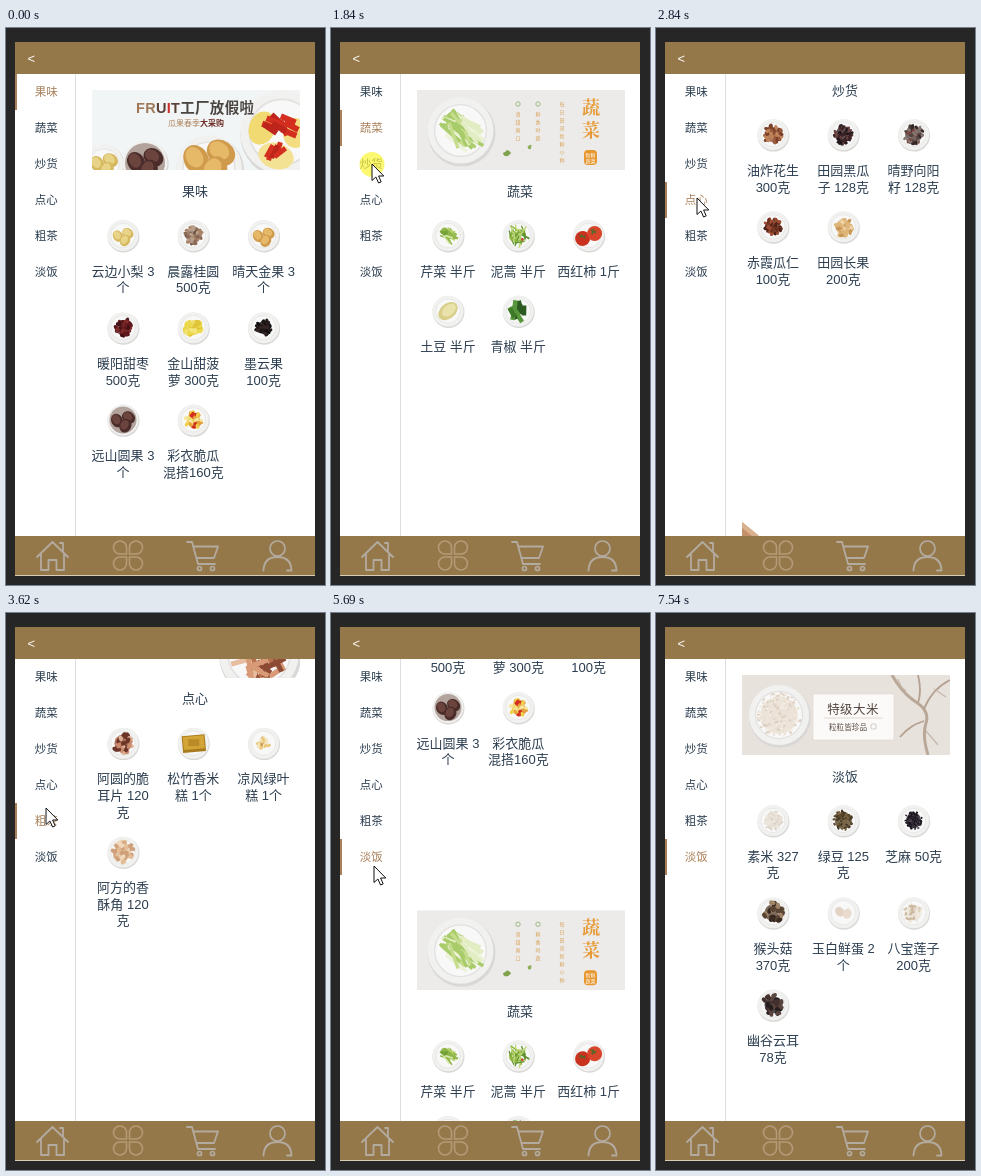
Recreate the animation shown at these times as an HTML page. Size 319x557 px, loop 7630 ms.

```html
<!DOCTYPE html>
<html lang="zh-CN">
<head>
<meta charset="utf-8">
<title>分类菜单</title>
<style>
  html, body { margin: 0; width: 100%; height: 100%; overflow: hidden; background: #262626; }
  svg { display: block; width: 100vw; height: 100vh; }
  text { font-family: "Liberation Sans", "Noto Sans CJK SC", "Noto Sans CJK", sans-serif; fill: #2c3e50; }
  .brush { font-family: "Noto Serif CJK SC", "Noto Sans CJK SC", serif; }
</style>
</head>
<body>
<svg id="stage" viewBox="0 0 319 557" xmlns="http://www.w3.org/2000/svg"></svg>
<script>
const LOOP = 7630, PITCH = 532.6, SCROLL = 450;
const GOLD = '#957849', ACTIVE = '#a9805a';

let seed = 1;
const rnd = () => (seed = seed * 16807 % 2147483647) / 2147483647;
const pick = list => list[Math.floor(rnd() * list.length)];

// Shape helpers; text is placed by its visual centre
const circle = (x, y, r, fill, extra = '') => `<circle cx="${x}" cy="${y}" r="${r}" fill="${fill}" ${extra}/>`;
const oval = (x, y, rx, ry, turn, fill) =>
  `<ellipse cx="${x}" cy="${y}" rx="${rx}" ry="${ry}" fill="${fill}" transform="rotate(${turn} ${x} ${y})"/>`;
const rect = (x, y, w, h, fill, extra = '') => `<rect x="${x}" y="${y}" width="${w}" height="${h}" fill="${fill}" ${extra}/>`;
const path = (d, fill, extra = '') => `<path d="${d}" fill="${fill}" ${extra}/>`;
const line = (d, color, w, extra = '') => path(d, 'none', `stroke="${color}" stroke-width="${w}" ${extra}`);
const text = (s, x, y, size, style = '', extra = '') =>
  `<text x="${x}" y="${(y + size * 0.37).toFixed(2)}" font-size="${size}" text-anchor="middle" style="${style}" ${extra}>${s}</text>`;
const column = (s, x, y, step, size, color, extra = '') =>
  [...s].map((c, i) => text(c, x, y + i * step, size, `fill:${color}`, extra)).join('');

// A random point inside a disc
function spot(x, y, spread) {
  const a = rnd() * 6.283, d = Math.sqrt(rnd()) * spread;
  return [+(x + d * Math.cos(a)).toFixed(1), +(y + d * Math.sin(a)).toFixed(1)];
}

function heap(x, y, spread, size, n, colors) {
  let out = circle(x, y, spread * 0.85, colors[0], 'opacity=".8"');
  for (let i = 0; i < n; i++) out += oval(...spot(x, y, spread), size, size * 0.68, Math.floor(rnd() * 180), pick(colors));
  return out;
}

function sticks(x, y, spread, len, n, colors, w, from = 0, range = 3.14) {
  let out = '';
  for (let i = 0; i < n; i++) {
    const [px, py] = spot(x, y, spread), b = from + rnd() * range;
    const dx = len / 2 * Math.cos(b), dy = len / 2 * Math.sin(b);
    out += line(`M${(px - dx).toFixed(1)} ${(py - dy).toFixed(1)}L${(px + dx).toFixed(1)} ${(py + dy).toFixed(1)}`, pick(colors), w);
  }
  return out;
}

// Three whole fruits, each with a lit side
const trio = (x, y, r, dark, light) => [[-0.85, 0.1, 60], [0.8, -0.35, 35], [0.35, 0.85, 120]].map(([a, b, turn]) => {
  const px = x + a * r, py = y + b * r;
  return oval(px, py, r, r * 0.82, turn, dark) + oval(px - r * 0.12, py - r * 0.15, r * 0.72, r * 0.55, turn, light);
}).join('');

const dish = (x, y, r) =>
  circle(x + r * 0.03, y + r * 0.06, r, '#d9d8d7') + circle(x, y, r * 0.97, '#f1f1f0') +
  circle(x, y, r * 0.76, '#f8f8f8', `stroke="#e2e1e0" stroke-width="${r * 0.04}"`);

// Food: spread, grain size, count, colours
const FOOD = {
  longan: [9, 2.2, 46, ['#8d6c57', '#a98468', '#6d5343', '#b9a08c']],
  date: [9, 2.6, 38, ['#5f191d', '#7f2b2a', '#431216']],
  pine: [9, 3, 30, ['#ecd84c', '#f3e57c', '#dfc438']],
  black: [7.5, 2.4, 40, ['#1d1718', '#352423', '#0f0d10']],
  mixed: [8, 2.6, 30, ['#f0cf4d', '#d32e20', '#e6a23a', '#f6e7a0']],
  nuts: [9, 2.5, 44, ['#9a5b3c', '#c08358', '#7a4029']],
  seeds: [9.5, 2, 56, ['#3b2326', '#6a4440', '#22171b']],
  husks: [10, 2, 56, ['#51443f', '#857670', '#332826', '#7d4a44']],
  rust: [8.5, 2.3, 46, ['#6c3020', '#9c4c30', '#4b2018']],
  pale: [9, 2.6, 36, ['#dfb67a', '#c89657', '#efd3a4']],
  ears: [10, 3, 32, ['#8e4a37', '#c98a6e', '#6c3528', '#dbb097']],
  mint: [6, 2.2, 18, ['#f3e3b9', '#e9c979', '#cf9a4a']],
  crisp: [10, 3, 34, ['#e3bd96', '#cfa07a', '#f0d8bd']],
  berry: [7, 2, 34, ['#4a261c', '#7d4631', '#2c1a16']],
  tea: [9, 1.8, 54, ['#7a7a4c', '#93925f', '#5d5c38']],
  leaf: [8, 2, 42, ['#4b3a28', '#76643a', '#8e3a2a', '#2f291f']],
  rice: [9.5, 1.3, 60, ['#e5ddd2', '#d8cfc2', '#eee8df']],
  bean: [10, 1.6, 66, ['#5c4a2e', '#7a6440', '#463823']],
  sesame: [9, 1.2, 90, ['#231c28', '#352c38', '#18141c']],
  shroom: [10, 3.2, 24, ['#5a4433', '#a08468', '#3a2a22', '#c9b49a']],
  lotus: [9.5, 1.7, 40, ['#ece4d8', '#ddd0bd', '#cbb89f']],
  fungus: [10, 3, 34, ['#241d1e', '#42302e', '#5a443e']]
};

const SPECIAL = {
  pear: (x, y) => trio(x, y, 6, '#d6b85f', '#e8d488'),
  mango: (x, y) => trio(x, y, 6.3, '#cf9a4c', '#e6b968'),
  brown: (x, y) => circle(x, y, 13.5, '#b3a39d') + trio(x, y, 7, '#4a2c2a', '#6b443d'),
  celery: (x, y) => sticks(x, y, 6, 10, 24, ['#b7d46e', '#d9e9b0', '#8fb548'], 1.6, 0.1, 0.9) + heap(x - 4, y - 4, 3, 2, 6, ['#8db545', '#74a038']),
  greens: (x, y) => sticks(x, y, 8, 10, 36, ['#8cb43c', '#bfd877', '#5f9130'], 1.3) + circle(x + 4, y + 4, 1.4, '#c8473a'),
  tomato: (x, y) => circle(x - 6, y + 3, 7.5, '#c9321f') + circle(x + 6, y - 2, 7.5, '#d9452a') +
    sticks(x + 5, y - 4, 1, 6, 4, ['#4d6b2a'], 1) + sticks(x - 6, y + 1, 1, 6, 4, ['#4d6b2a'], 1),
  potato: (x, y) => oval(x, y, 11, 7.5, -40, '#d9cf8b') + oval(x + 1, y - 1, 8, 5, -40, '#eae2ab'),
  pepper: (x, y) => sticks(x, y, 7, 10, 12, ['#3f7a2a', '#57963a', '#2b5b20'], 4.6, 0.6, 1.2),
  cake: (x, y) => rect(x - 11, y - 8, 23, 17, '#a87a1e', `transform="rotate(-5 ${x} ${y})"`) +
    rect(x - 10, y - 7, 21, 13, '#d2a536', `transform="rotate(-5 ${x} ${y})"`) + rect(x - 5, y - 4, 11, 7, '#b98a26'),
  eggs: (x, y) => oval(x - 3.5, y - 1, 5.2, 4.2, 50, '#e3d3c5') + oval(x + 4, y + 1, 5.2, 4.2, 110, '#e9dccf')
};

function food(kind, x, y) {
  return dish(x, y, 16) + (SPECIAL[kind] ? SPECIAL[kind](x, y) : heap(x, y, ...FOOD[kind]));
}

// Banners use a local 208 x 80 box
const BANNERS = [
  () => rect(0, 0, 208, 80, '#f1f5f5') +
    dish(12, 74, 20) + trio(12, 73, 8, '#d6b85f', '#e8d488') +
    dish(53, 73, 23) + circle(53, 73, 20, '#b3a39d') + trio(53, 71, 10.5, '#4a2c2a', '#6b443d') +
    dish(117, 78, 34) + trio(117, 68, 15, '#cf9a4c', '#e6b968') +
    dish(190, 42, 43) + oval(170, 38, 13, 17, 20, '#f1da72') + oval(184, 66, 18, 13, 15, '#f4e294') +
    oval(203, 43, 12, 15, 0, '#f3dd80') + sticks(188, 36, 13, 16, 9, ['#d32e20', '#bd241b'], 6, 0.2, 1) +
    sticks(182, 60, 8, 14, 5, ['#d32e20', '#bd241b'], 5, 1.8, 0.8) +
    `<text x="44" y="23" font-size="14.5" font-weight="bold" letter-spacing=".3" style="fill:#4a4543"><tspan style="fill:#a0795a">FR</tspan><tspan style="fill:#5b4038">U</tspan><tspan style="fill:#c9302a">I</tspan><tspan style="fill:#5b4038">T</tspan>工厂放假啦</text>` +
    `<text x="76" y="36" font-size="8" style="fill:#b0845f">瓜果春季<tspan font-weight="bold" style="fill:#6b2c24">大采购</tspan></text>`,
  () => rect(0, 0, 208, 80, '#ecebea') + dish(43.5, 40.5, 34) +
    heap(37, 30, 10, 4, 16, ['#a3c75a', '#8ab346', '#bcd87c']) +
    sticks(45, 42, 13, 27, 34, ['#c4dc8c', '#e2edc4', '#a9cc6a', '#edf3da'], 3.2, 0.35, 0.9) +
    circle(101, 14, 2.2, 'none', 'stroke="#8fae6a" stroke-width=".8"') + circle(121, 14, 2.2, 'none', 'stroke="#8fae6a" stroke-width=".8"') +
    column('清甜爽口', 101, 24, 8, 5, '#d9a35a') + column('鲜香时蔬', 121, 24, 8, 5, '#d9a35a') +
    column('每日田间新鲜小种', 145, 14, 8, 5, '#d9a35a') +
    heap(90, 64, 2.5, 2.2, 7, ['#7ea34a']) + heap(113, 57, 1.5, 1.5, 5, ['#8fae5c']) +
    column('蔬菜', 174, 17, 23, 18, '#e79a35', 'class="brush" font-weight="600"') +
    rect(167, 60, 13, 15, '#e7952d', 'rx="4"') +
    text('新鲜', 173.5, 65, 5, 'fill:#fff') + text('蔬菜', 173.5, 71, 5, 'fill:#fff'),
  () => rect(0, 0, 208, 80, '#eee6dc') + dish(150, 40, 34) + heap(150, 40, 21, 4, 60, ['#9a5b3c', '#c08358', '#7a4029']),
  () => rect(0, 0, 208, 80, '#fff') + path('M0 0L16 13L38 40L0 58Z', '#d9b08d') + path('M0 6L12 16L0 26Z', '#c3906b') +
    dish(167, 56, 41) + sticks(167, 58, 24, 18, 46, ['#b9704f', '#d89a77', '#8d4a34', '#e7bd9f'], 5),
  () => rect(0, 0, 208, 80, '#fefefe') +
    path('M0 44L10 30L20 34L34 20L58 48L80 60L0 70Z', '#efefee') +
    path('M98 40L112 27L124 34L138 30L160 46L182 42L208 54V60H110Z', '#f2f2f1') +
    path('M0 70Q18 60 40 69T90 72L140 75L90 77H0Z', '#dcdddc') +
    line('M0 73Q8 66 18 71T40 73', '#8d8f8d', 1.3) + line('M96 36L112 27L122 33L134 31', '#cfd0cf', 1) +
    circle(53, 40, 35, 'none', 'stroke="#d3bda6" stroke-width="1"') + circle(55, 40, 33, 'none', 'stroke="#e5d8c9" stroke-width=".7"') +
    dish(77, 41, 27) + heap(77, 41, 16, 1.8, 190, ['#757a42', '#8d9156', '#5f6436']) +
    text('春', 150, 55, 24, 'fill:#6f6d38', 'class="brush" font-weight="500"') + text('茶', 181, 55, 24, 'fill:#6f6d38', 'class="brush" font-weight="500"'),
  () => rect(0, 0, 208, 80, '#e8e2dd') +
    dish(37, 40, 31) + heap(37, 40, 22, 1.5, 150, ['#eadfd2', '#ddd0c2', '#f3ece4']) +
    line('M150 0Q160 18 174 27T184 48T186 80', '#b9a898', 3) + line('M208 5Q190 14 182 34M176 0Q180 16 176 28M182 46Q168 50 158 62', '#b3a091', 1.8) +
    line('M164 16Q158 12 156 4M184 56L196 70M192 14L204 22', '#c6b7aa', 1.2) +
    rect(71, 19, 81, 46, '#fbfaf9', 'stroke="#dcd4cd" stroke-width=".6"') +
    text('特级大米', 111, 34, 12.5, 'fill:#54463f;letter-spacing:.4px') + line('M82 43H141', '#cfc4bb', .6) +
    text('粒粒皆珍品', 106, 52, 7.6, 'fill:#54463f') + rect(129, 49, 5, 5, 'none', 'rx="1" stroke="#b9aaa0" stroke-width=".6"')
];

const SECTIONS = [
  ['果味', '云边小梨 3|个,pear', '晨露桂圆|500克,longan', '晴天金果 3|个,mango', '暖阳甜枣|500克,date', '金山甜菠|萝 300克,pine',
    '墨云果|100克,black', '远山圆果 3|个,brown', '彩衣脆瓜|混搭160克,mixed'],
  ['蔬菜', '芹菜 半斤,celery', '泥蒿 半斤,greens', '西红柿 1斤,tomato', '土豆 半斤,potato', '青椒 半斤,pepper'],
  ['炒货', '油炸花生|300克,nuts', '田园黑瓜|子 128克,seeds', '晴野向阳|籽 128克,husks', '赤霞瓜仁|100克,rust', '田园长果|200克,pale'],
  ['点心', '阿圆的脆|耳片 120|克,ears', '松竹香米|糕 1个,cake', '凉风绿叶|糕 1个,mint', '阿方的香|酥角 120|克,crisp'],
  ['粗茶', '丹枝枸果 6|克*3袋,berry', '碧螺春 12|克*3袋,tea', '西湖龙井 8|克*3袋,leaf'],
  ['淡饭', '素米 327|克,rice', '绿豆 125|克,bean', '芝麻 50克,sesame', '猴头菇|370克,shroom', '玉白鲜蛋 2|个,eggs',
    '八宝莲子|200克,lotus', '幽谷云耳|78克,fungus']
];

function section([name, ...items], index) {
  seed = 97 + index * 1013;
  let out = `<g transform="translate(86 62)" clip-path="url(#banner)">${BANNERS[index]()}</g>` + text(name, 189, 162.7, 13);
  let y = 207.5, rows = 0;
  items.forEach((item, i) => {
    const [label, kind] = item.split(','), lines = label.split('|'), col = i % 3;
    if (i && !col) { y += 59 + 16.6 * rows; rows = 0; }
    rows = Math.max(rows, lines.length);
    const x = 117 + col * 70.3;
    out += food(kind, x, y) + lines.map((s, k) => text(s, x, y + 35.5 + k * 16.6, 13)).join('');
  });
  return `<g transform="translate(0 ${index * PITCH})">${out}</g>`;
}

function tabIcons() {
  const grey = '#b3aaa0', petal = 'M-1.5-1.5H-8A6.5 6.5 0 1 1-1.5-8Z';
  const pen = d => line(d, grey, 1.8, 'stroke-linejoin="round" stroke-linecap="round"');
  const ring = (x, y, r) => circle(x, y, r, 'none', `stroke="${grey}" stroke-width="1.7"`);
  return pen('M31 529L46.5 514L62 529M35 526V542H42.5V532H50.5V542H58V526M57 523V515H54') +
    [0, 90, 180, 270].map(a => line(petal, '#b59a78', 1.6, `transform="translate(122 527.5) rotate(${a})"`)).join('') +
    pen('M181 514H186L192 536H209M188 518.5H212L208 530H191') + ring(193.5, 540.5, 2) + ring(206.5, 540.5, 2) +
    ring(271.5, 520.5, 7.5) + pen('M257.5 542.5Q258 529 271.5 529T285.5 542.5H281');
}

const stage = document.getElementById('stage');
stage.innerHTML = `<defs>
  <clipPath id="view"><rect x="70" y="46" width="239" height="462"/></clipPath>
  <clipPath id="banner"><rect width="208" height="80"/></clipPath></defs>` +
  rect(0, 0, 319, 557, '#262626') + rect(9, 14, 300, 534, '#fff') +
  `<g clip-path="url(#view)"><g id="list">${SECTIONS.map(section).join('')}</g></g>` +
  rect(69, 46, 1, 462, '#dcdfe2') + rect(9, 46, 2, 36, ACTIVE, 'id="bar"') +
  SECTIONS.map((s, i) => text(s[0], 40.3, 64 + i * 36, 11.5, '', 'class="nav"')).join('') +
  rect(9, 14, 300, 32, GOLD) + text('&lt;', 25.2, 30, 13, 'fill:#fff') +
  rect(9, 508, 300, 39, GOLD) + rect(9, 547, 300, 1, '#d8ccb5') + tabIcons() +
  `<g id="cursor">${circle(0, 0.5, 12.5, '#fbf53c', 'id="halo" opacity=".72"')}` +
  path('M0 0V16.5L3.9 13L6.6 19L9.2 17.9L6.6 12H11.8Z', '#fff', 'stroke="#111" stroke-width="1" stroke-linejoin="round"') + '</g>';

const [list, bar, cursor, halo] = ['list', 'bar', 'cursor', 'halo'].map(id => document.getElementById(id));
const navs = [...stage.querySelectorAll('.nav')];

// Clicks: press time, release time, chosen section
const CLICKS = [[690, 800, 1], [1800, 1900, 2], [2630, 2712, 3], [3430, 3509, 4], [4230, 4293.3, 0], [5520, 5593.4, 5], [7540, LOOP, 5]];
// Pointer: time, x, y
const TRACK = [[0, 255, 572], [70, 246, 550], [620, 41, 112], [1250, 41, 112], [1760, 41, 136], [2300, 41, 136], [2610, 41, 170],
  [3150, 41, 170], [3400, 40, 195], [3930, 40, 195], [4080, 39, 71], [5170, 39, 71], [5500, 43, 253], [5840, 43, 253],
  [5930, 92, 290], [6690, 285, 529], [6950, 285, 529], [7080, 276, 562], [7540, 295, 569], [LOOP, 295, 569]];
const ease = p => (1 - Math.cos(Math.PI * Math.min(1, Math.max(0, p)))) / 2;

function pointer(t) {
  const i = TRACK.findIndex(k => k[0] > t);
  const [t0, x0, y0] = TRACK[i - 1], [t1, x1, y1] = TRACK[i];
  const p = ease((t - t0) / (t1 - t0));
  return [x0 + (x1 - x0) * p, y0 + (y1 - y0) * p];
}

function draw(t) {
  let active = 0, pos = 0, pressed = false;
  for (const [down, up, target] of CLICKS) {
    if (t >= down && t < up) pressed = true;
    if (t < up) break;
    pos += (target - active) * ease((t - up) / SCROLL);
    active = target;
  }
  list.setAttribute('transform', `translate(0 ${-pos * PITCH})`);
  bar.setAttribute('y', 46 + active * 36);
  navs.forEach((n, i) => { n.style.fill = i === active ? ACTIVE : '#2c3e50'; });
  cursor.setAttribute('transform', `translate(${pointer(t).join(' ')})`);
  halo.style.display = pressed ? '' : 'none';
}

const start = performance.now();
function tick() {
  draw((performance.now() - start) % LOOP);
  requestAnimationFrame(tick);
}
tick();
</script>
</body>
</html>
```
